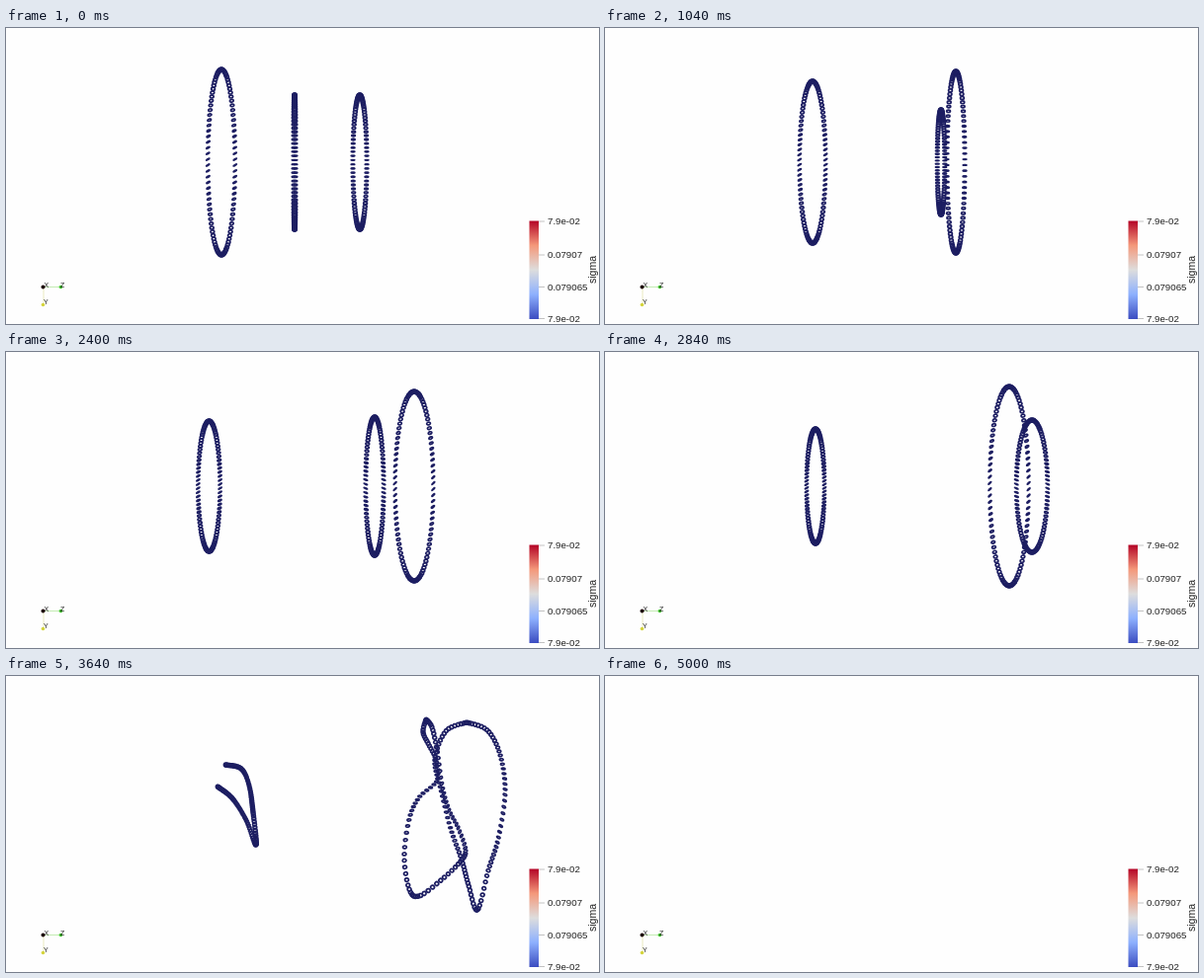
An HTML page with a canvas that plays this animation: 600 px wide and 300 px high, repeating every 5.04 s.

```html
<!DOCTYPE html>
<html lang="en">
<head>
<meta charset="utf-8">
<title>Vortex rings</title>
<style>
  html, body { margin: 0; width: 100%; height: 100%; overflow: hidden; background: #fefefe; }
  canvas, svg { position: absolute; left: 0; top: 0; width: 600px; height: 300px; }
  text { font-family: "Liberation Sans", Arial, sans-serif; fill: #222; }
  .tick { font-size: 9.7px; }
  .axis { font-size: 7px; }
</style>
</head>
<body>
<svg viewBox="0 0 600 300">
  <defs>
    <linearGradient id="coolwarm" x1="0" y1="0" x2="0" y2="1">
      <stop offset="0" stop-color="#b40426"/>
      <stop offset=".25" stop-color="#f4987a"/>
      <stop offset=".5" stop-color="#dddddd"/>
      <stop offset=".75" stop-color="#8db0fe"/>
      <stop offset="1" stop-color="#3b4cc0"/>
    </linearGradient>
  </defs>
  <rect x="529.5" y="195.5" width="9.5" height="99.5" fill="url(#coolwarm)"/>
  <path d="M539 196h6M539 230h6M539 262.500h6M539 294.500h6" stroke="#aaa" stroke-width=".7"/>
  <g class="tick">
    <text x="548" y="199">7.9e-02</text>
    <text x="548" y="233">0.07907</text>
    <text x="548" y="265.500">0.079065</text>
    <text x="548" y="297.500">7.9e-02</text>
  </g>
  <text transform="translate(597 259) rotate(-90)" font-size="10.5">sigma</text>
  <path d="M38 262.500H55" stroke="#b5e6a0" stroke-width=".8"/>
  <path d="M38 262.500V280" stroke="#e8e8b0" stroke-width=".8"/>
  <circle cx="37.500" cy="262.500" r="2" fill="#200c0c"/>
  <circle cx="55.500" cy="262.500" r="1.800" fill="#3fc42c"/>
  <circle cx="37.500" cy="280.500" r="1.800" fill="#d4d43c"/>
  <g class="axis">
    <text x="38.500" y="263">X</text>
    <text x="55" y="263">Z</text>
    <text x="38" y="280">Y</text>
  </g>
</svg>
<canvas></canvas>
<script>
const LOOP = 5040, STEP = 40, COUNT = 100;
const WARP_START = 2840, WARP_FULL = 3640, BURST = 3940, GONE = 4080;
const MID_X = 300, MID_Y = 136, DEPTH = 560;

// keys: time, centre x, radius. warp: curve from the ring's top, clockwise.
const rings = [
  {
    keys: [[0, 218, 94], [1040, 210, 82], [1920, 206.5, 76], [2400, 205.5, 66], [2840, 213, 58], [3640, 236, 44]],
    warp: [[222, 90], [238, 94], [246, 111], [250, 138], [253, 171], [243, 146], [229, 124], [214, 112]],
    tilt: () => -0.6
  },
  {
    keys: [[0, 292, 68], [1040, 340, 53], [1400, 370, 57], [1920, 392, 74], [2400, 413, 96], [2650, 414, 102.5], [2840, 409, 101], [3640, 424, 88]],
    warp: [[425, 44], [431, 52], [436, 75], [441, 110], [448, 135], [458, 155], [465, 177], [459, 189], [440, 207],
      [418, 223], [408, 216], [403, 183], [408, 145], [418, 123], [436, 106], [435, 85], [428, 70], [422, 57], [425, 44]],
    tilt: t => -0.8 * clamp((t - 1500) / 900)
  },
  {
    keys: [[0, 358, 68], [1040, 355, 92], [1200, 352, 93], [1920, 339, 82.5], [2400, 373, 70], [2650, 404, 63], [2840, 432, 67], [3640, 468, 90]],
    warp: [[466, 47], [487, 55], [500, 80], [505, 118], [498, 165], [488, 197], [477, 237], [468, 212], [461, 186],
      [450, 155], [440, 115], [434, 85], [445, 56], [466, 47]],
    tilt: t => 0.4 * clamp((t - 1500) / 900)
  }
];

const canvas = document.querySelector("canvas");
const scale = window.devicePixelRatio || 1;
canvas.width = 600 * scale;
canvas.height = 300 * scale;
const ctx = canvas.getContext("2d");
ctx.scale(scale, scale);
ctx.strokeStyle = "#1d1e62";
ctx.lineWidth = 1.7;

function clamp(v) { return Math.max(0, Math.min(1, v)); }

function noise(n) {
  const s = Math.sin(n * 12.9898 + 4.1) * 43758.5453;
  return s - Math.floor(s);
}

// Cubic Hermite interpolation with slopes taken from the neighbouring keys.
function track(keys, t, col) {
  let i = 0;
  while (i < keys.length - 2 && t >= keys[i + 1][0]) i++;
  const slope = k => {
    const a = keys[Math.max(0, k - 1)], b = keys[Math.min(keys.length - 1, k + 1)];
    return (b[col] - a[col]) / (b[0] - a[0]);
  };
  const [a, b] = [keys[i], keys[i + 1]];
  const span = b[0] - a[0], u = clamp((t - a[0]) / span), v = 1 - u;
  return v * v * (1 + 2 * u) * a[col] + u * u * (1 + 2 * v) * b[col]
    + u * v * span * (v * slope(i) - u * slope(i + 1));
}

function spline(points, u) {
  const last = points.length - 1;
  const i = Math.min(last - 1, Math.floor(u * last)), f = u * last - i;
  const at = k => points[Math.max(0, Math.min(last, k))];
  const [a, b, c, d] = [at(i - 1), at(i), at(i + 1), at(i + 2)];
  return [0, 1].map(n => b[n] + f / 2 * (c[n] - a[n]
    + f * (2 * a[n] - 5 * b[n] + 4 * c[n] - d[n] + f * (3 * (b[n] - c[n]) + d[n] - a[n]))));
}

function warpAmount(t) {
  const k = Math.max(0, (t - WARP_START) / (WARP_FULL - WARP_START));
  return k < 1 ? k ** 2.2 : 1 + 1.2 * (k - 1);
}

function place(ring, t, u) {
  const x = track(ring.keys, t, 1), r = track(ring.keys, t, 2);
  const angle = u * 2 * Math.PI, w = warpAmount(t);
  const flat = Math.abs(x - MID_X) / DEPTH;
  const base = [x + r * flat * Math.sin(angle), MID_Y - r * Math.cos(angle)];
  if (!w) return base;
  const bent = spline(ring.warp, u);
  return base.map((v, n) => v + w * (bent[n] - v));
}

function drawRing(ring, index, t) {
  const w = clamp(warpAmount(t));
  const burst = Math.max(0, (t - BURST) / (GONE - BURST));
  for (let i = 0; i < COUNT; i++) {
    const u = (i + 0.5) / COUNT, angle = u * 2 * Math.PI;
    let [x, y] = place(ring, t, u);
    const [nx, ny] = place(ring, t, Math.min(1, u + 0.004));
    if (burst) {
      const seed = i + index * COUNT, dir = noise(seed) * 2 * Math.PI;
      const reach = 700 * burst * noise(seed + 500);
      x += reach * Math.cos(dir);
      y += reach * Math.sin(dir);
    }
    // Each marker is a small disc facing along the ring's tangent.
    const face = Math.abs(Math.cos(angle));
    const along = Math.atan2(ny - y, nx - x) + Math.PI / 2;
    const lean = ring.tilt(t) * (1 - face);
    const turn = burst ? angle : lean + w * along;
    const minor = 0.3 + 1.6 * Math.max(face, w * 0.4);
    ctx.beginPath();
    ctx.ellipse(x, y, 1.9, minor, turn, 0, 2 * Math.PI);
    ctx.stroke();
  }
}

function frame(now) {
  const t = Math.floor((now % LOOP) / STEP) * STEP;
  ctx.clearRect(0, 0, 600, 300);
  if (t < GONE) rings.forEach((ring, i) => drawRing(ring, i, t));
  requestAnimationFrame(frame);
}
frame(performance.now());
</script>
</body>
</html>
```
